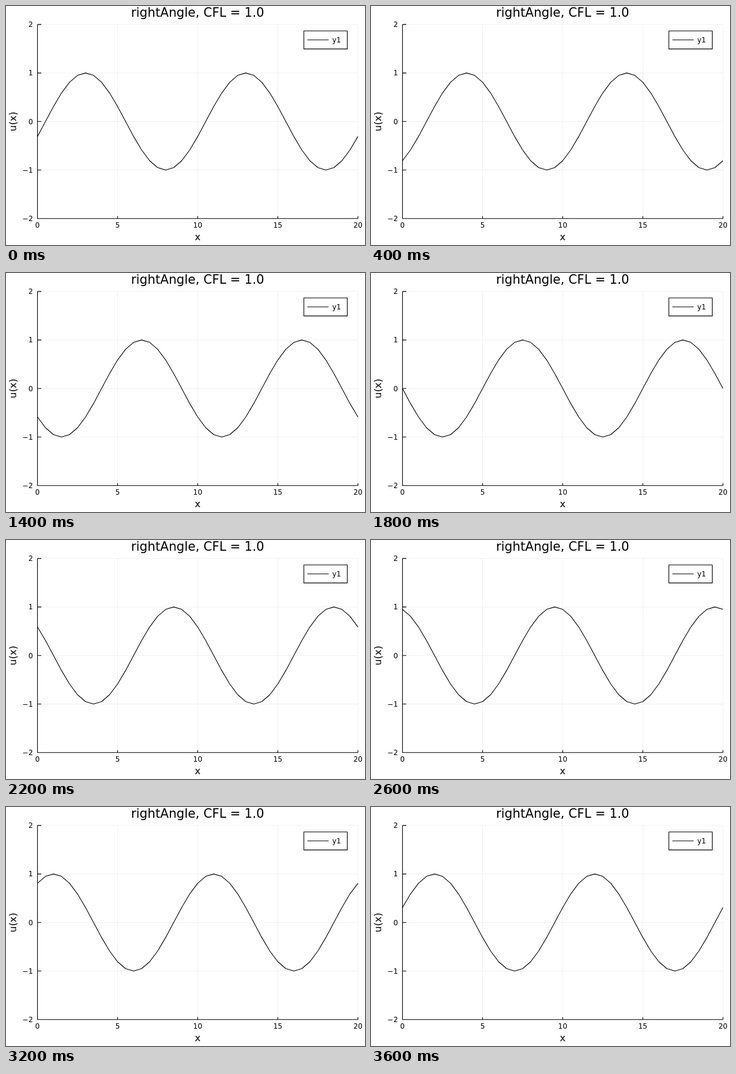
Recreate the animation shown at these times as an HTML page. Size 600 by 400 pixels, loop 3.8 s.

```html
<!DOCTYPE html>
<html lang="en">
<head>
<meta charset="utf-8">
<title>Advected sine wave</title>
<style>
  html, body { margin: 0; width: 100%; height: 100%; overflow: hidden; background: #fff; }
  svg { display: block; width: 600px; height: 400px; }
  text { font-family: "DejaVu Sans", sans-serif; font-size: 11.85px; fill: #000; }
  path, rect { fill: none; stroke: #000; stroke-width: 1.1; stroke-linejoin: round; }
  #grid { stroke-opacity: .1; stroke-width: .6; }
  .mid { text-anchor: middle; }
  .end { text-anchor: end; }
  .title { font-size: 20.75px; }
  .label { font-size: 16.3px; }
</style>
</head>
<body>
<svg viewBox="0 0 600 400">
  <path id="grid"/>
  <path id="axes"/>
  <g id="ticks"></g>
  <path id="wave"/>
  <text class="mid title" x="320.3" y="18">rightAngle, CFL = 1.0</text>
  <text class="mid label" x="320.3" y="392">x</text>
  <text class="mid label" transform="translate(16.5 193.3) rotate(-90)">u(x)</text>
  <rect x="497.8" y="41.7" width="72.6" height="30.2"/>
  <path d="M503.7 56.8H539.3"/>
  <text x="545.2" y="61.1">y1</text>
</svg>
<script>
const STEP_MS = 200, STEPS = 19, DX = 0.5, WAVELENGTH = 10;
const LEFT = 52.6, RIGHT = 588.2, TOP = 30.9, BOTTOM = 355.7;
const X_TICK = 3.9, Y_TICK = 6.4;

const byId = id => document.getElementById(id);
const px = x => LEFT + (RIGHT - LEFT) * x / 20;
const py = u => BOTTOM - (BOTTOM - TOP) * (u + 2) / 4;

function addLabel(text, x, y, anchor) {
  const node = document.createElementNS("http://www.w3.org/2000/svg", "text");
  node.textContent = text;
  node.setAttribute("x", x);
  node.setAttribute("y", y);
  node.setAttribute("class", anchor);
  byId("ticks").append(node);
}

function drawAxes() {
  let grid = "", axes = `M${LEFT} ${TOP}V${BOTTOM}H${RIGHT}`;
  for (let x = 0; x <= 20; x += 5) {
    grid += `M${px(x)} ${BOTTOM}V${TOP}`;
    axes += `M${px(x)} ${BOTTOM}v${-X_TICK}`;
    addLabel(x, px(x), 371, "mid");
  }
  for (let u = -2; u <= 2; u++) {
    grid += `M${LEFT} ${py(u)}H${RIGHT}`;
    axes += `M${LEFT} ${py(u)}h${Y_TICK}`;
    addLabel(String(u).replace("-", "\u2212"), 45, py(u) + 4.3, "end");
  }
  byId("grid").setAttribute("d", grid);
  byId("axes").setAttribute("d", axes);
}

function drawWave(step) {
  const points = Array.from({ length: 20 / DX + 1 }, (_, i) => {
    const phase = 2 * Math.PI * DX * (i - 1 - step) / WAVELENGTH;
    return `${px(i * DX).toFixed(2)} ${py(Math.sin(phase)).toFixed(2)}`;
  });
  byId("wave").setAttribute("d", "M" + points.join("L"));
}

const start = performance.now();
let shown = 0;
function tick(now) {
  const step = Math.floor(Math.max(0, now - start) / STEP_MS) % STEPS;
  if (step !== shown) drawWave(shown = step);
  requestAnimationFrame(tick);
}

drawAxes();
drawWave(0);
requestAnimationFrame(tick);
</script>
</body>
</html>
```
